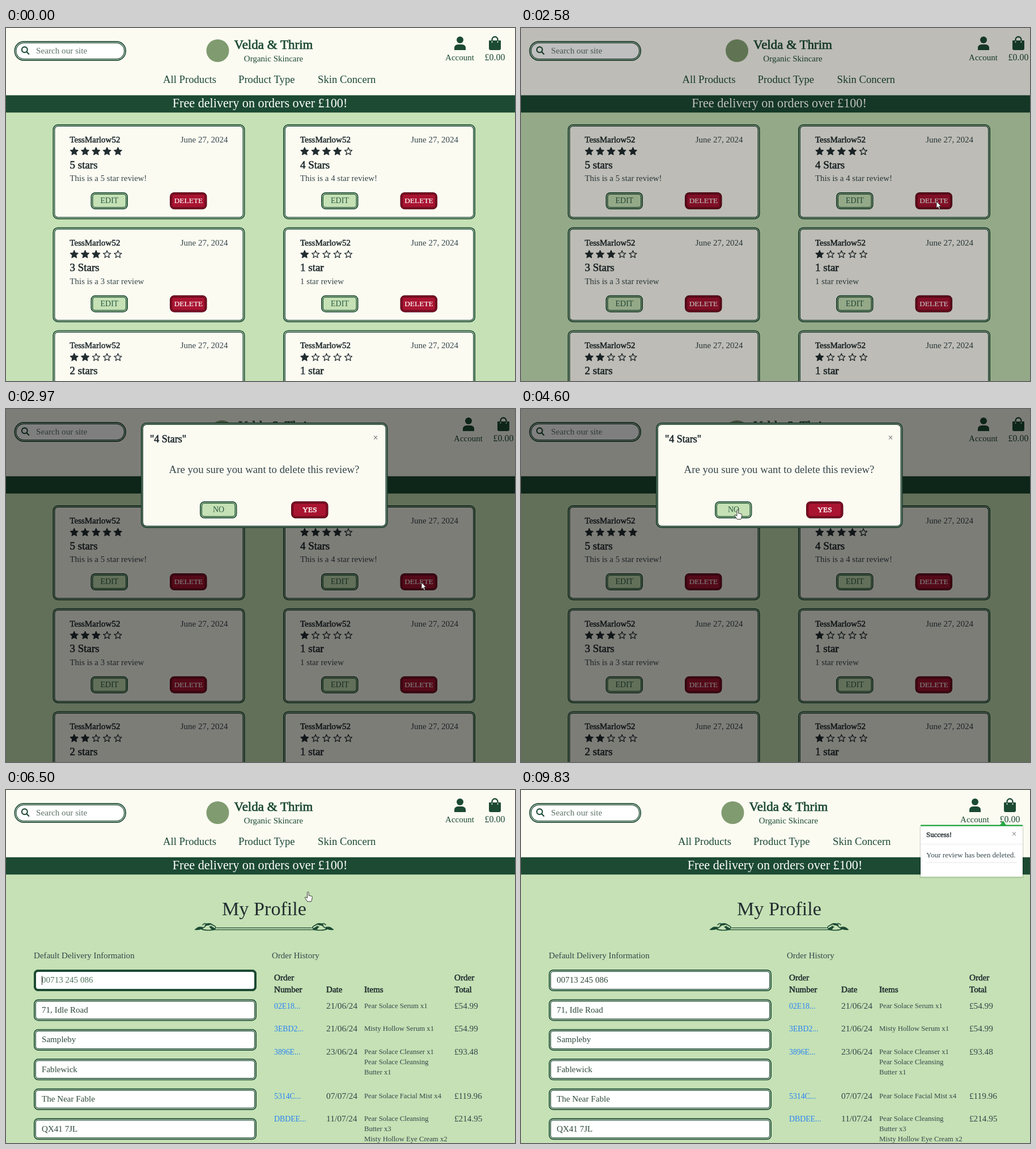
These frames come from a looping animation (898 by 623 pixels, 9.93 s). An HTML page:

```html
<!DOCTYPE html>
<html lang="en">
<head>
<meta charset="utf-8">
<title>Review removal</title>
<style>
html, body { margin: 0; width: 100%; height: 100%; overflow: hidden; background: #c5e1b5; }
svg { display: block; width: 100vw; height: 100vh; font-family: "Liberation Serif", "Times New Roman", serif; }
</style>
</head>
<body>
<svg id="stage" viewBox="0 0 898 623" preserveAspectRatio="none"></svg>
<script>
const LOOP = 9930;
const GREEN = '#1c4a33', LEAF = '#c5e1b5', CREAM = '#fcfbf2', INK = '#222d30', TEXT = '#35464a',
      RED = '#a91431', WINE = '#560918';

const text = (x, y, size, str, fill = INK, { anchor = 'start', bold = 0, id = '' } = {}) =>
  `<text x="${x}" y="${y}" font-size="${size}" fill="${fill}" text-anchor="${anchor}"` +
  (bold ? ` stroke="${fill}" stroke-width="${bold}"` : '') + (id ? ` id="${id}"` : '') +
  `>${str.replace(/&/g, '&amp;')}</text>`;

const rect = (x, y, w, h, r, fill, extra = '') =>
  `<rect x="${x}" y="${y}" width="${w}" height="${h}" rx="${r}" fill="${fill}" ${extra}/>`;

// Box with a double border
const box = (x, y, w, h, r, line, gap, fill) =>
  [[0, line], [1.7, gap], [2.7, line], [4, fill]].map(([d, c]) =>
    rect(x + d, y + d, w - 2 * d, h - 2 * d, Math.max(r - d, 1), c)).join('');

const button = (x, y, label, danger, id) =>
  box(x, y, 65.5, 30, 8, danger ? WINE : GREEN, danger ? RED : LEAF, danger ? RED : LEAF) +
  text(x + 33, y + 19, danger ? 13.4 : 14, label, danger ? '#fff' : '#2c5a43', { anchor: 'middle', id, bold: danger ? .15 : 0 });

function star(cx, cy, full) {
  const pts = Array.from({ length: 10 }, (_, i) => {
    const a = i * Math.PI / 5, r = (i % 2 ? 3.4 : 7.2) - (full ? 0 : .3);
    return [(cx + r * Math.sin(a)).toFixed(1), (cy - r * Math.cos(a)).toFixed(1)];
  });
  return `<polygon points="${pts.join(' ')}" fill="${full ? INK : 'none'}" stroke="${INK}" stroke-width="1.3" stroke-linejoin="round"/>`;
}

function header() {
  const nav = [[277, 'All Products'], [410, 'Product Type'], [550, 'Skin Concern']];
  return rect(0, 0, 898, 119, 0, CREAM) + rect(0, 118.7, 898, 30.5, 0, GREEN) +
    box(14.5, 23, 197.5, 35, 17, GREEN, '#dfe9dc', '#fff') +
    `<g fill="none" stroke="${GREEN}" stroke-width="2.1" stroke-linecap="round"><circle cx="32.8" cy="38.3" r="4.9"/><path d="M36.6 42.2L40.3 46"/></g>` +
    text(53, 45, 15.2, 'Search our site', '#5d7267') +
    '<g id="mid">' +
    '<circle cx="373.5" cy="40" r="20" fill="#809b70"/>' +
    text(472, 37, 23, 'Velda & Thrim', GREEN, { anchor: 'middle', bold: .7 }) +
    text(472, 58.5, 15, 'Organic Skincare', GREEN, { anchor: 'middle' }) +
    nav.map(([x, s]) => text(x, 97, 18.7, s, GREEN)).join('') +
    text(448, 140, 22.2, 'Free delivery on orders over £100!', '#fff', { anchor: 'middle' }) +
    '</g><g id="side">' +
    `<g fill="${GREEN}"><circle cx="801" cy="21" r="6"/><path d="M791 39V35.5Q791 29 798 29H804Q811 29 811 35.5V39Z"/>` +
    `<path d="M852 22H873V36Q873 39 870 39H855Q852 39 852 36Z"/></g>` +
    `<path d="M857.5 25V20.5a5 5 0 0 1 10 0V25" fill="none" stroke="${GREEN}" stroke-width="2.3"/>` +
    '<path d="M857.5 23V26M867.5 23V26" stroke="#dfe9dc" stroke-width="1.4"/>' +
    text(800.5, 57, 15, 'Account', GREEN, { anchor: 'middle' }) +
    text(862.5, 57, 15.9, '£0.00', GREEN, { anchor: 'middle' }) + '</g>';
}

function card([stars, title, body], i) {
  const x = i % 2 ? 489 : 82.5, y = 170 + 181.7 * (i >> 1);
  return box(x, y, 339, 167.5, 9, GREEN, '#cfe2c6', CREAM) +
    text(x + 30, y + 32, 15, 'TessMarlow52', INK, { bold: .55 }) +
    text(x + 309, y + 32, 15, 'June 27, 2024', TEXT, { anchor: 'end' }) +
    [0, 1, 2, 3, 4].map(k => star(x + 37.8 + 19.3 * k, y + 48, k < stars)).join('') +
    text(x + 30, y + 77.5, 19, title, INK, { bold: .6 }) +
    text(x + 30, y + 100, 14.9, body, TEXT) +
    button(x + 67, y + 120, 'EDIT', false) +
    button(x + 206.5, y + 120, 'DELETE', true, i === 1 ? 'del' : '');
}

const reviews = () => [
  [5, '5 stars', 'This is a 5 star review!'], [4, '4 Stars', 'This is a 4 star review!'],
  [3, '3 Stars', 'This is a 3 star review'], [1, '1 star', '1 star review'],
  [2, '2 stars', ''], [1, '1 star', '']
].map(card).join('');

function ornament() {
  const half = `<g fill="none" stroke="${GREEN}" stroke-linecap="round">
    <path d="M455.5 243.3H372M455.5 246.6H366" stroke-width="1.3"/>
    <path d="M334 246Q346 247 352 240T366 239Q374 243 367 245T362 240" stroke-width="1.7"/>
    <path d="M344 245Q352 249 366 246.6M356 238Q351 233 347 238" stroke-width="1.6"/></g>
    <path d="M333 247Q338 239 348 242Q344 248 333 247ZM350 239Q354 233 363 236Q359 240 350 239ZM358 241Q365 240 370 246Q362 247 358 241Z" fill="${GREEN}"/>`;
  return half + `<g transform="translate(911 0) scale(-1 1)">${half}</g>`;
}

function profile() {
  const fields = ['00713 245 086', '71, Idle Road', 'Sampleby', 'Fablewick', 'The Near Fable', 'QX41 7JL'];
  const orders = [
    [386, '02E18...', '21/06/24', '£54.99', ['Pear Solace Serum x1']],
    [426, '3EBD2...', '21/06/24', '£54.99', ['Misty Hollow Serum x1']],
    [467, '3896E...', '23/06/24', '£93.48', ['Pear Solace Cleanser x1', 'Pear Solace Cleansing', 'Butter x1']],
    [545, '5314C...', '07/07/24', '£119.96', ['Pear Solace Facial Mist x4']],
    [585, 'DBDEE...', '11/07/24', '£214.95', ['Pear Solace Cleansing', 'Butter x3', 'Misty Hollow Eye Cream x2']]
  ];
  const heads = [[473, 336, 'Order'], [473, 357, 'Number'], [565, 357, 'Date'], [632, 357, 'Items'],
                 [791, 336, 'Order'], [791, 357, 'Total']];
  return text(455.5, 221, 34.2, 'My Profile', INK, { anchor: 'middle' }) + ornament() +
    text(49, 297, 15.1, 'Default Delivery Information', TEXT) +
    text(469, 297, 15, 'Order History', TEXT) +
    fields.map((s, i) => {
      const y = 317 + 52.45 * i;
      const focus = i ? '' : `<g id="focus">${rect(49, y, 393, 38, 8, GREEN) + rect(53, y + 4, 385, 30, 4, '#fff')}</g>`;
      return box(49, y, 393, 38, 8, GREEN, '#dcead3', '#fff') + focus +
        text(63, y + 23.3, 15.1, s, '#2f4a3c', { id: i ? '' : 'phone' });
    }).join('') +
    rect(63, 328, 1, 16, 0, '#222', 'id="caret"') +
    heads.map(([x, y, s]) => text(x, y, 15.1, s, INK, { bold: .55 })).join('') +
    orders.map(([y, num, date, total, items]) =>
      text(473, y, 13.8, num, '#2a84f5') + text(565, y, 15.5, date, TEXT) + text(791, y, 15.2, total, TEXT) +
      items.map((s, k) => text(632, y - 1.5 + 18.4 * k, 12.7, s, TEXT)).join('')).join('');
}

const toast = () =>
  rect(703, 64, 184, 92, 2, '#000', 'opacity=".06"') + rect(704, 63, 182, 91, 1, '#000', 'opacity=".09"') +
  rect(705, 62, 180, 91, 0, '#fff') + rect(705, 61.5, 180, 2.4, 0, '#28a745') +
  '<path d="M845 62L850.5 54L856 62Z" fill="#28a745"/>' +
  rect(705, 95, 180, 1, 0, '#ebebeb') + rect(715, 127.5, 160, 1, 0, '#e6e6e6') +
  text(715, 83, 12.9, 'Success!', INK, { bold: .45 }) + text(870, 83, 16, '×', '#777', { anchor: 'middle' }) +
  text(715, 119, 13.1, 'Your review has been deleted.', TEXT);

const modal = () =>
  box(238, 24, 435.5, 186, 10, '#17392a', '#8fa389', CREAM) +
  text(254, 59, 18, '"4 Stars"', INK, { bold: .6 }) + text(652, 56, 16, '×', '#555', { anchor: 'middle' }) +
  text(455.5, 113, 18.8, 'Are you sure you want to delete this review?', TEXT, { anchor: 'middle' }) +
  button(342, 163, 'NO', false, 'no') + button(503, 163, 'YES', true, 'yes');

const cursor = () => '<g id="cursor" fill="#fff" stroke="#222" stroke-width=".9" stroke-linejoin="round">' +
  '<path id="arrow" d="M0 0V11.8L2.7 9.4 4.6 13.9 6.5 13 4.7 8.7H8.2Z"/>' +
  '<path id="hand" d="M-1.5 1.2a1.3 1.3 0 0 1 2.6 0V6.2l5.2 1.2q1.2.4 1 1.8l-.9 5.3-1 2.3H-1.2L-5.5 10.6q-.6-1.6 1-1.6l3 1.8Z"/></g>';

document.getElementById('stage').innerHTML =
  rect(0, 0, 898, 623, 0, LEAF) +
  `<g id="reviews">${reviews()}</g><g id="profile">${profile()}</g>` + header() +
  rect(0, 0, 898, 623, 0, '#000', 'id="dim"') +
  `<g id="modal">${modal()}</g><g id="toast">${toast()}</g>` +
  `<g id="strip">${rect(0, 616.5, 302, 10, 0, '#94090f') + text(20, 630, 13, 'Please wait while the selected review is removed', '#fff')}</g>` +
  cursor();

const $ = id => document.getElementById(id);
const show = (id, on) => $(id).setAttribute('visibility', on ? 'visible' : 'hidden');
const move = (id, x, y) => $(id).setAttribute('transform', `translate(${x.toFixed(2)} ${y.toFixed(2)})`);
const clamp = v => Math.min(1, Math.max(0, v));
const within = (t, a, b) => t >= a && t < b;

// Progress in n jumps, the first at a and the last at b
const steps = (t, a, b, n) => t < a ? 0 : n < 2 ? 1 : Math.min(1, (Math.floor((t - a) / (b - a) * (n - 1) + 1e-6) + 1) / n);

// start, end, jumps, destination, bend
const path = [
  [320, 1300, 13, 735, 312, -10, -22], [1400, 1550, 3, 734, 305, 0, 0], [1720, 1890, 3, 733, 304, 0, 0],
  [2060, 2060, 1, 733, 306, 0, 0], [3420, 4270, 11, 376, 178, 0, -20], [4600, 5170, 8, 528, 174, 0, 0],
  [5950, 6070, 2, 533, 180, 0, 0], [7830, 8000, 3, 728, 280, 0, 0], [8510, 8840, 5, 826, 550, 0, 0],
  [9080, 9340, 4, 866, 640, 0, 0]
];

function pointer(t) {
  let x = 863, y = 600;
  for (const [a, b, n, tx, ty, bx, by] of path) {
    if (t < a) break;
    const p = steps(t, a, b, n), e = p * p * (3 - 2 * p), bow = 4 * e * (1 - e);
    x += (tx - x) * e + bx * bow;
    y += (ty - y) * e + by * bow;
  }
  return [x, y];
}

function draw(t) {
  const done = t >= 6500, open = within(t, 2420, 6500);
  show('reviews', !done);
  show('profile', done);
  move('mid', open ? 7.5 : 0, 0);
  move('side', open ? 15 : 0, 0);

  // The dialog fades in on an 80 ms beat
  const beat = 2970 + Math.floor((t - 2970) / 80) * 80;
  $('dim').setAttribute('opacity', open ? .5 * clamp((beat - 2450) / 240) : 0);
  const p = open ? clamp((beat - 2730) / 240) : 0;
  $('modal').setAttribute('opacity', clamp(2 * p));
  move('modal', 0, -50 * (1 - p) ** 2);

  const rise = steps(t, 5350, 5440, 2);
  show('strip', rise > 0 && !done);
  move('strip', 0, 6.5 * (1 - rise));

  $('toast').setAttribute('opacity', done ? steps(t, 6580, 6750, 3) : 0);
  const focused = done && t < 9830;
  show('focus', focused);
  show('caret', focused && Math.floor((t - 6470) / 510) % 2 === 0);
  $('phone').setAttribute('fill', focused ? '#537562' : '#2f4a3c');

  const [x, y] = pointer(t);
  const inBox = (l, top) => x > l && x < l + 65 && y > top && y < top + 30;
  const onDel = t < 2420 && inBox(696, 290), onNo = open && inBox(342, 163), onYes = open && inBox(503, 163);
  const hand = onDel || onNo || onYes || within(t, 6500, 7830), seen = within(t, 320, 9340);
  move('cursor', x, y);
  show('arrow', seen && !hand);
  show('hand', seen && hand);
  $('del').setAttribute('fill', onDel ? '#ecd9d9' : '#fff');
  $('yes').setAttribute('fill', onYes ? '#ecd9d9' : '#fff');
  $('yes').setAttribute('stroke-width', onYes ? .1 : .5);
}

function tick() {
  draw(performance.now() % LOOP);
  requestAnimationFrame(tick);
}
tick();
</script>
</body>
</html>
```
